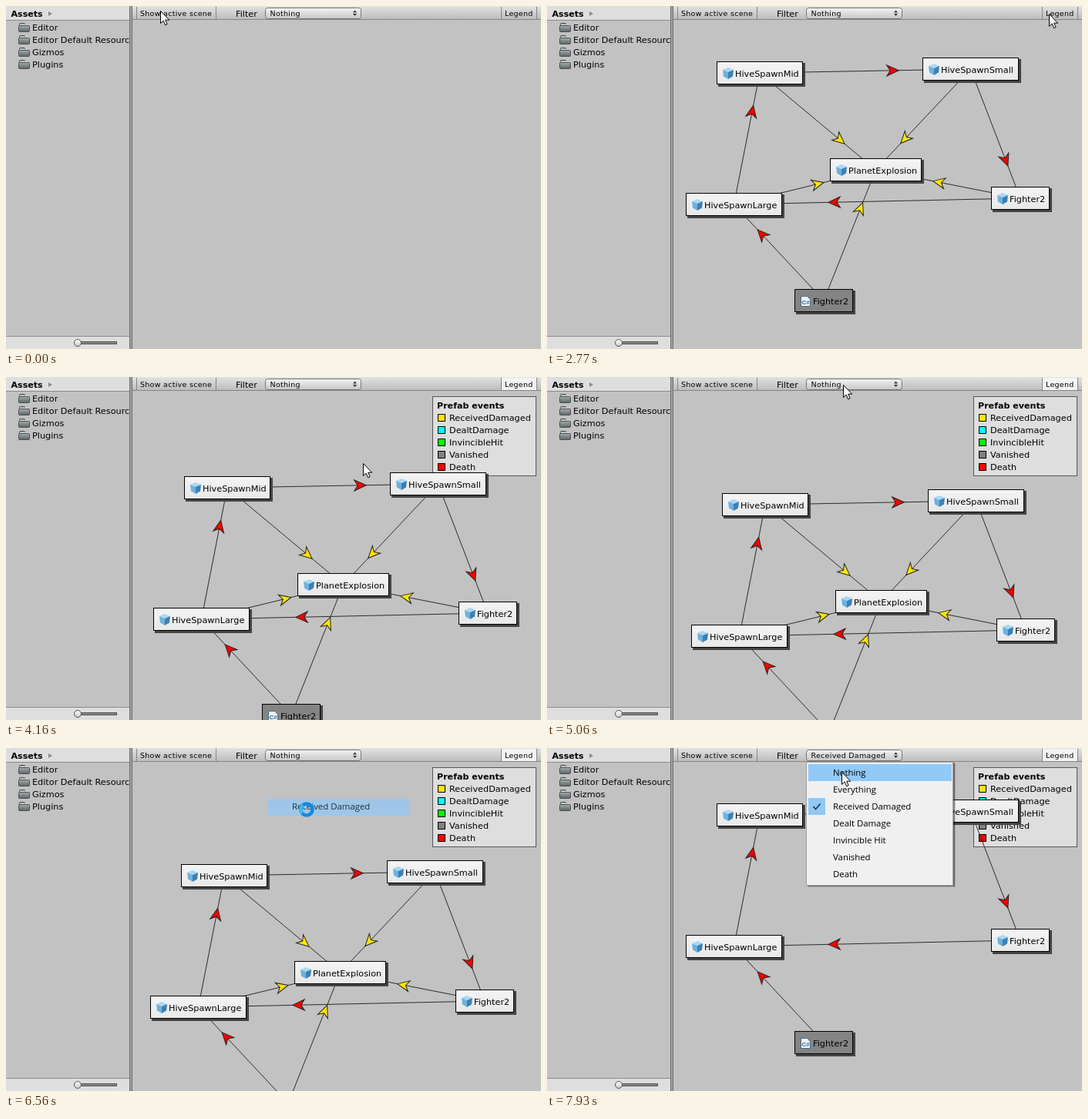
Write an HTML page with a canvas that moves like this. It is 694x446 px and loops after 8 s.

```html
<!DOCTYPE html>
<html lang="en">
<head>
<meta charset="utf-8">
<title>Prefab event graph</title>
<style>
html, body { margin: 0; width: 100%; height: 100%; overflow: hidden; background: #c2c2c2; }
canvas { display: block; }
</style>
</head>
<body>
<canvas id="stage" width="694" height="446"></canvas>
<script>
const g = document.getElementById('stage').getContext('2d');
const LOOP = 8000;
const UI = '11.25px "DejaVu Sans", sans-serif';
const BOLD = 'bold 11.1px "DejaVu Sans", sans-serif';
const SMALL = '9.5px "DejaVu Sans", sans-serif';
const MENU = '11.4px "Open Sans", sans-serif';

const TICKS = [[1270, 0], [1540, 2], [1670, 3], [2240, 7], [2360, 8], [2770, 11], [2920, 12],
  [3320, 15], [3470, 16], [3740, 18], [3860, 19], [4480, 23], [4620, 24], [5060, 27], [5210, 28],
  [5630, 31], [5750, 32], [6290, 36], [6560, 38], [6680, 39], [7500, 45], [7650, 46], [7930, 48]];

// [update, x, y] of the pointer tip.
const POINTER = [[3, 200, 6], [5, 330, 12], [7, 560, 16], [9, 648, 11], [11, 651, 10], [13, 651, 10],
  [15, 454, 48], [16, 452, 55], [18, 461, 85], [20, 463, 112], [22, 459, 134], [23, 459, 134],
  [25, 410, 45], [26, 388, 14], [27, 384, 10], [31, 384, 10], [32, 384, 21], [36, 381, 79],
  [39, 381, 79], [42, 384, 12], [43, 384, 9], [45, 384, 9], [47, 382, 27], [48, 382, 31]];

// x, y, width, and the drift left over while the layout settles.
const NODES = {
  mid: { label: 'HiveSpawnMid', x: 220, y: 72, w: 112, dx: 2, dy: 0 },
  small: { label: 'HiveSpawnSmall', x: 487, y: 67, w: 125, dx: 0, dy: 0 },
  blast: { label: 'PlanetExplosion', x: 367, y: 198, w: 119, dx: 1, dy: 2 },
  fighter: { label: 'Fighter2', x: 576, y: 235, w: 76, dx: 0, dy: -2 },
  large: { label: 'HiveSpawnLarge', x: 180, y: 243, w: 125, dx: 0, dy: -2 },
  script: { label: 'Fighter2', x: 321, y: 368, w: 76, dx: -1, dy: 0, script: true }
};
const NODE_H = 30;
const EDGES = ['mid small', 'small fighter', 'fighter large', 'large mid', 'script large',
  'mid blast', 'small blast', 'large blast', 'fighter blast', 'script blast'].map(e => e.split(' '));
const EVENTS = [['ReceivedDamaged', '#ffe600'], ['DealtDamage', '#00ffff'], ['InvincibleHit', '#00ff00'],
  ['Vanished', '#808080'], ['Death', '#ff0000']];
const OPTIONS = ['Nothing', 'Everything', 'Received Damaged', 'Dealt Damage', 'Invincible Hit', 'Vanished', 'Death'];

function sample(keys, at) {
  if (at <= keys[0][0]) return keys[0].slice(1);
  for (let i = 1; i < keys.length; i++) {
    const a = keys[i - 1], b = keys[i];
    if (at < b[0]) return a.slice(1).map((v, j) => v + (b[j + 1] - v) * (at - a[0]) / (b[0] - a[0]));
  }
  return keys[keys.length - 1].slice(1);
}

function rect(x, y, w, h, fill) {
  g.fillStyle = fill;
  g.fillRect(x, y, w, h);
}

function frame(x, y, w, h, fill, line) {
  rect(x, y, w, h, line);
  rect(x + 1, y + 1, w - 2, h - 2, fill);
}

function text(str, x, y, font = UI, color = '#000') {
  g.font = font;
  g.letterSpacing = font === SMALL ? '0.28px' : '0px';
  g.fillStyle = color;
  g.fillText(str, x, y);
}

function poly(points, fill, line, width = 1) {
  g.beginPath();
  points.forEach(p => g.lineTo(...p));
  g.closePath();
  g.fillStyle = fill;
  g.fill();
  if (!line) return;
  g.strokeStyle = line;
  g.lineWidth = width;
  g.stroke();
}

function shade(y0, y1, top, bottom) {
  const s = g.createLinearGradient(0, y0, 0, y1);
  s.addColorStop(0, top);
  s.addColorStop(1, bottom);
  return s;
}

function folder(x, y) {
  g.lineWidth = 1;
  g.strokeStyle = '#4a4f50';
  g.beginPath();
  g.roundRect(x + 1.5, y + .5, 7, 5, 1);
  g.fillStyle = '#a4abab';
  g.fill();
  g.stroke();
  g.beginPath();
  g.roundRect(x + .5, y + 3.5, 14, 8, 1);
  g.fillStyle = shade(y + 3, y + 12, '#a9b0b0', '#566062');
  g.fill();
  g.stroke();
  rect(x + 2, y + 2, 11, 1, '#d4d8d8');
}

function sidebar() {
  rect(0, 0, 160, 446, '#c2c2c2');
  rect(0, 0, 160, 18, '#dedede');
  rect(0, 18, 160, 1, '#8a8a8a');
  text('Assets', 6.5, 14, BOLD);
  poly([[55, 7], [60, 10], [55, 13]], '#8c8c8c');
  g.save();
  g.beginPath();
  g.rect(0, 0, 160, 446);
  g.clip();
  ['Editor', 'Editor Default Resources', 'Gizmos', 'Plugins'].forEach((name, i) => {
    folder(16, 22 + i * 16);
    text(name, 34, 32 + i * 16);
  });
  g.restore();
  rect(0, 429, 160, 17, '#dedede');
  rect(0, 429, 160, 1, '#8a8a8a');
  frame(93, 436, 51, 4, '#858585', '#555');
  g.beginPath();
  g.arc(93, 438, 4.5, 0, 7);
  g.fillStyle = shade(433, 443, '#fff', '#c8c8c8');
  g.fill();
  g.strokeStyle = '#555';
  g.lineWidth = 1;
  g.stroke();
  rect(160, 0, 4, 446, '#a2a2a2');
  rect(160, 0, 1, 446, '#6c6c6c');
  rect(163, 0, 1, 446, '#6c6c6c');
}

function toolbar(scenePressed, legendOn, filter) {
  rect(164, 0, 530, 17, shade(0, 17, '#e2e2e2', '#bdbdbd'));
  rect(164, 17, 530, 1, '#858585');
  if (scenePressed) rect(170, 1, 102, 16, '#efefef');
  if (legendOn) rect(643, 1, 45, 16, '#f3f3f3');
  for (const x of [169, 272, 642, 688]) rect(x, 1, 1, 16, '#858585');
  text('Show active scene', 174, 13, SMALL);
  text('Filter', 298, 14);
  text('Legend', 647, 13, SMALL);
  g.beginPath();
  g.roundRect(336.5, 2.5, 124, 14, 3);
  g.fillStyle = shade(2, 17, '#f4f4f4', '#c6c6c6');
  g.fill();
  g.strokeStyle = '#747474';
  g.lineWidth = 1;
  g.stroke();
  text(filter, 342.5, 13, SMALL);
  poly([[450, 8.5], [452.5, 5.5], [455, 8.5]], '#333');
  poly([[450, 10], [452.5, 13], [455, 10]], '#333');
}

function legend() {
  frame(553, 25, 135, 104, '#dedede', '#555');
  text('Prefab events', 559, 41, BOLD);
  EVENTS.forEach(([name, color], i) => {
    frame(560, 48 + i * 16, 10, 10, color, '#000');
    text(name, 575, 57 + i * 16);
  });
}

function cube(x, y) {
  poly([[x, y + 3], [x + 7, y], [x + 14, y + 3], [x + 7, y + 6]], '#a9d8f2');
  poly([[x, y + 3], [x + 7, y + 6], [x + 7, y + 15], [x + 1, y + 11.5]], '#6db1de');
  poly([[x + 14, y + 3], [x + 7, y + 6], [x + 7, y + 15], [x + 13, y + 11.5]], '#3c80b4');
}

function page(x, y) {
  poly([[x + .5, y + .5], [x + 8.5, y + .5], [x + 12.5, y + 4.5], [x + 12.5, y + 13.5], [x + .5, y + 13.5]],
    '#eef4f8', '#456d8c');
  text('C#', x + 1.5, y + 10.5, 'bold 8px "Liberation Sans", sans-serif', '#2b6c9e');
}

function edge(a, b, color) {
  const dx = b.cx - a.cx, dy = b.cy - a.cy;
  const inside = n => Math.min(n.w / 2 / Math.abs(dx), NODE_H / 2 / Math.abs(dy));
  const from = inside(a), to = 1 - inside(b), tip = from + (to - from) * .75;
  g.beginPath();
  g.moveTo(a.cx, a.cy);
  g.lineTo(b.cx, b.cy);
  g.strokeStyle = '#2c2c2c';
  g.lineWidth = 1;
  g.stroke();
  g.save();
  g.translate(a.cx + dx * tip, a.cy + dy * tip);
  g.rotate(Math.atan2(dy, dx));
  poly([[8, 0], [-7.5, -7], [-3, 0], [-7.5, 7]], color, '#222');
  g.restore();
}

function graph(ox, oy, drift, filtered) {
  const placed = {};
  for (const id in NODES) {
    const n = NODES[id];
    const x = Math.round(n.x + n.dx * drift + ox), y = Math.round(n.y + n.dy * drift + oy);
    placed[id] = { ...n, x, y, cx: x + n.w / 2, cy: y + NODE_H / 2 };
  }
  for (const [from, to] of EDGES) {
    const hit = to === 'blast';
    if (!(hit && filtered)) edge(placed[from], placed[to], hit ? '#ffe600' : '#ff0000');
  }
  for (const id in placed) {
    if (id === 'blast' && filtered) continue;
    const n = placed[id];
    rect(n.x + 2, n.y + 2, n.w + 1, NODE_H + 1, '#444');
    frame(n.x, n.y, n.w, NODE_H, n.script ? '#848484' : shade(n.y, n.y + NODE_H, '#f4f4f4', '#e8e8e8'), '#000');
    if (n.script) page(n.x + 8, n.y + 9);
    else cube(n.x + 8, n.y + 8);
    text(n.label, n.x + 24, n.y + 20);
  }
}

function menu(checked, hover) {
  rect(339, 20, 191, 161, 'rgba(0,0,0,.15)');
  rect(338, 19, 191, 161, 'rgba(0,0,0,.35)');
  frame(336, 18, 191, 161, '#f0f0f0', '#a0a0a0');
  if (hover >= 0) rect(339, 21 + hover * 22, 186, 22, '#91c9f7');
  const y = 21 + checked * 22;
  rect(339, y, 22, 22, '#90c8f6');
  g.beginPath();
  g.moveTo(345.5, y + 11);
  g.lineTo(348.5, y + 14.5);
  g.lineTo(354.5, y + 7.5);
  g.strokeStyle = '#12304f';
  g.lineWidth = 1.5;
  g.stroke();
  OPTIONS.forEach((name, i) => text(name, 371, 36 + i * 22, MENU));
}

function fadingChoice() {
  rect(339, 66, 185, 22, '#9fc6e8');
  text(OPTIONS[2], 371, 80, MENU, '#26303a');
}

function busy(x, y) {
  g.beginPath();
  g.arc(x, y, 7.5, 0, 7);
  g.strokeStyle = '#1289e0';
  g.lineWidth = 4.5;
  g.stroke();
  g.beginPath();
  g.arc(x, y, 7.5, 2.4, 4);
  g.strokeStyle = '#45b4f5';
  g.stroke();
}

function pointer(x, y) {
  const shape = [[0, 0], [0, 16], [3.7, 12.6], [6.2, 18.3], [8.6, 17.2], [6.2, 11.7], [11.2, 11.7]];
  poly(shape.map(([px, py]) => [x + .5 + px, y + .5 + py]), '#fff', '#000');
}

function draw(t) {
  const n = t < 1270 ? -1 : Math.floor(sample(TICKS, t)[0] + 1e-6);
  const [px, py] = sample(POINTER, n).map(Math.round);
  const filtered = n >= 39;
  const legendOn = n >= 12;

  rect(0, 0, 694, 446, '#c2c2c2');
  if (n >= 13) legend();
  if (n >= 0) {
    const dragging = n >= 16 && !filtered;
    const [hx, hy] = sample(POINTER, Math.min(n, 22));
    const drift = Math.max(0, 1.4 - n * .2);
    graph(dragging ? hx - 452 : 0, dragging ? hy - 55 : 0, drift, filtered);
  }
  sidebar();
  toolbar(t >= 840 && n < 0, legendOn, OPTIONS[filtered ? 2 : 0]);
  if ((n >= 29 && n < 38) || n >= 44) menu(filtered ? 2 : 0, Math.floor((py - 21) / 22));
  if (n === 38) {
    fadingChoice();
    busy(390, 80);
  } else {
    pointer(px, py);
  }
}

function loop() {
  draw(performance.now() % LOOP);
  requestAnimationFrame(loop);
}
loop();
</script>
</body>
</html>
```
